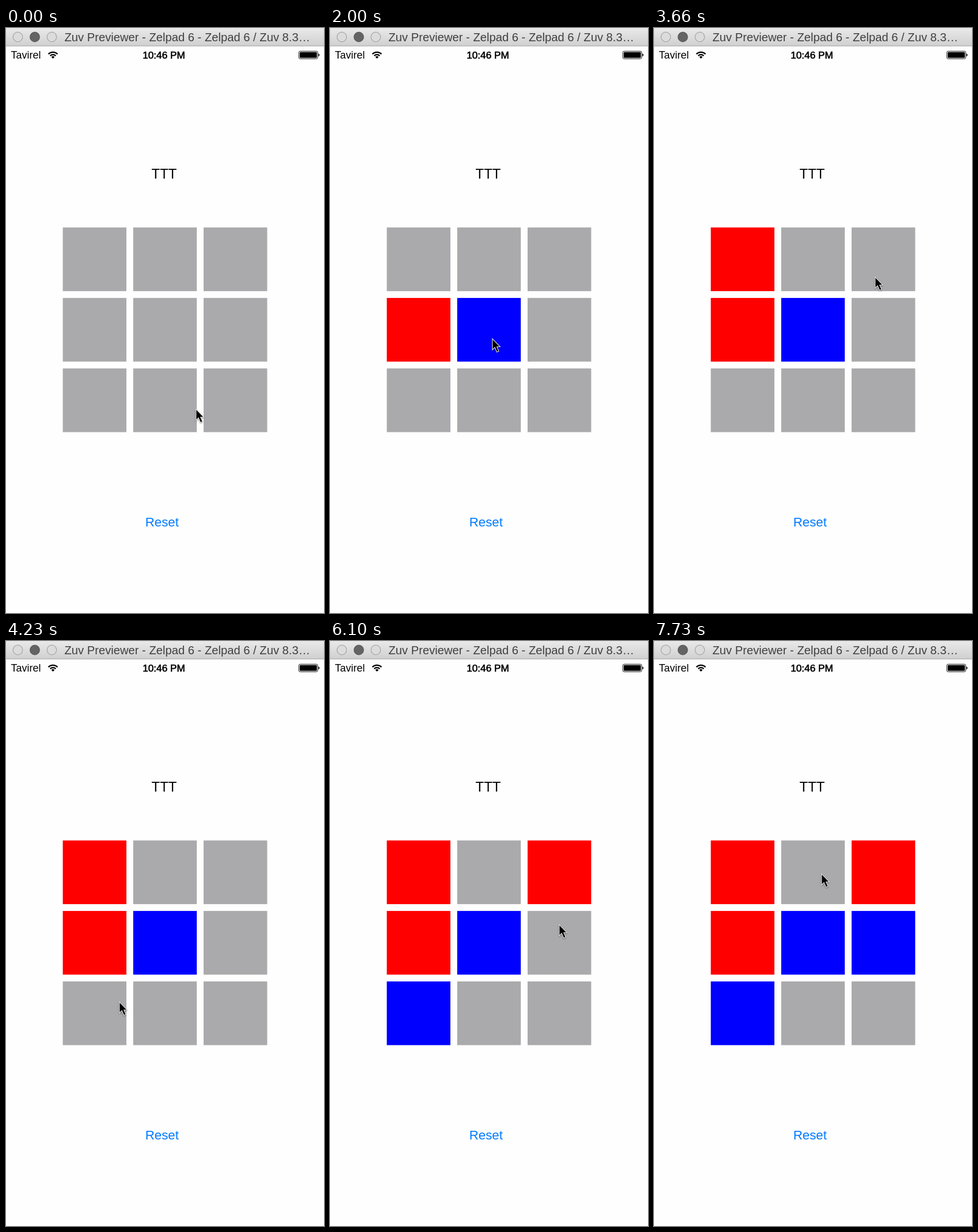
Animation, 552 px wide and 1014 px high, one loop 8000 ms. Source, as an HTML page:

```html
<!DOCTYPE html>
<html lang="en">
<head>
<meta charset="utf-8">
<title>Three in a row</title>
<style>
  html, body { margin: 0; width: 100%; height: 100%; overflow: hidden; background: #fefefe; }
  svg { display: block; }
  text { font-family: "Liberation Sans", Arial, sans-serif; }
  #cursor { filter: drop-shadow(0 1.5px 1.2px rgba(0, 0, 0, .45)); }
</style>
</head>
<body>
<svg width="552" height="1014" viewBox="0 0 552 1014">
  <defs>
    <linearGradient id="bar" x2="0" y2="1">
      <stop stop-color="#e9e9e9"/>
      <stop offset="1" stop-color="#d0d0d0"/>
    </linearGradient>
  </defs>

  <!-- window title bar -->
  <rect width="552" height="31" fill="url(#bar)"/>
  <rect y="30.5" width="552" height="1.2" fill="#adadad"/>
  <g fill="#dcdcdc" stroke="#a6a6a6" stroke-width="1.2">
    <circle cx="20.5" cy="15.5" r="8.3"/>
    <circle cx="50" cy="15.5" r="8.3" fill="#646464" stroke="#585858"/>
    <circle cx="79.5" cy="15.5" r="8.3"/>
  </g>
  <text x="101.5" y="22.5" font-size="20.2" fill="#404040">Zuv Previewer - Zelpad 6 - Zelpad 6 / Zuv 8.3…</text>

  <!-- status bar -->
  <text x="8.5" y="53" font-size="18">Tavirel</text>
  <g fill="none" stroke="#000" stroke-width="2.3">
    <path d="M73.6 45.1a11.1 11.1 0 0 1 15.8 0M76.7 48.2a6.8 6.8 0 0 1 9.6 0"/>
    <path d="M81.5 53l-2.8-2.8a4 4 0 0 1 5.6 0z" fill="#000" stroke="none"/>
  </g>
  <text x="274" y="53" font-size="17.2" text-anchor="middle" stroke="#000" stroke-width=".6">10:46 PM</text>
  <rect x="508.2" y="40.2" width="33" height="13.2" rx="2.5" fill="none" stroke="#000" stroke-width=".9"/>
  <rect x="509.8" y="41.8" width="29.8" height="10" rx="1.2"/>
  <path d="M542.4 44.3q1.9.6 1.9 2.5t-1.9 2.5z"/>

  <text x="274.5" y="260.5" font-size="24" text-anchor="middle">TTT</text>
  <g id="board"></g>
  <text x="270.8" y="864" font-size="22.3" text-anchor="middle" fill="#007aff">Reset</text>

  <g id="cursor">
    <path d="M1.4 3V19.6L5.3 15.8 8.9 24 11.4 22.9 7.9 14.9H13Z"
      stroke="#e4e4e4" stroke-width="2.2" paint-order="stroke"/>
  </g>
</svg>
<script>
const LOOP = 8000, SIDE = 110.4, PITCH = 122.2;
const GREY = '#aaaaac', RED = '#f00', BLUE = '#00f';

// time, cell index, colour
const taps = [
  [830, 3, RED], [2000, 4, BLUE], [3130, 0, RED],
  [4500, 6, BLUE], [5800, 2, RED], [6930, 5, BLUE]
];

const easeIn = u => u * u;
const easeOut = u => 1 - (1 - u) ** 2;
const settle = u => 1 - (1 - u) ** 3;
const smooth = u => u * u * (3 - 2 * u);

// start, end, x and y reached, easing
const home = [329, 659];
const moves = [
  [0, 466, 172, 536, smooth],
  [1300, 1333, 174, 535, smooth],
  [1333, 1700, 281, 537, smooth],
  [2233, 2566, 165, 419, smooth],
  [3333, 3500, 270, 415, easeIn],
  [3500, 3666, 383, 430, easeOut],
  [3733, 3900, 311, 515, easeIn],
  [3900, 4166, 206, 616, easeOut],
  [4166, 4333, 178, 639, smooth],
  [4733, 4900, 318, 600, easeIn],
  [4900, 5033, 363, 510, easeOut],
  [5200, 5400, 386, 424, smooth],
  [5533, 5600, 387, 424, smooth],
  [6000, 6100, 397, 490, easeIn],
  [6100, 6400, 425, 539, settle],
  [7166, 7733, 290, 402, smooth]
];

const cursor = document.getElementById('cursor');
const board = document.getElementById('board');
const cells = Array.from({ length: 9 }, (_, i) => {
  const cell = document.createElementNS(board.namespaceURI, 'rect');
  cell.setAttribute('x', 98.6 + i % 3 * PITCH);
  cell.setAttribute('y', 345.7 + Math.floor(i / 3) * PITCH);
  cell.setAttribute('width', SIDE);
  cell.setAttribute('height', SIDE);
  return board.appendChild(cell);
});

function cursorAt(time) {
  let [x, y] = home;
  for (const [start, end, toX, toY, ease] of moves) {
    if (time <= start) break;
    const k = ease(Math.min(1, (time - start) / (end - start)));
    x += (toX - x) * k;
    y += (toY - y) * k;
  }
  return [x, y];
}

function draw(now) {
  const time = now % LOOP;
  const fills = Array(9).fill(GREY);
  for (const [at, cell, colour] of taps) if (time >= at) fills[cell] = colour;
  cells.forEach((cell, i) => cell.setAttribute('fill', fills[i]));

  // the pointer is sampled 30 times a second
  const tick = Math.floor(time * .03 + .25) / .03;
  const [x, y] = cursorAt(tick).map(Math.round);
  cursor.setAttribute('transform', `translate(${x} ${y})`);
}

function loop() {
  draw(performance.now());
  requestAnimationFrame(loop);
}
loop();
</script>
</body>
</html>
```
